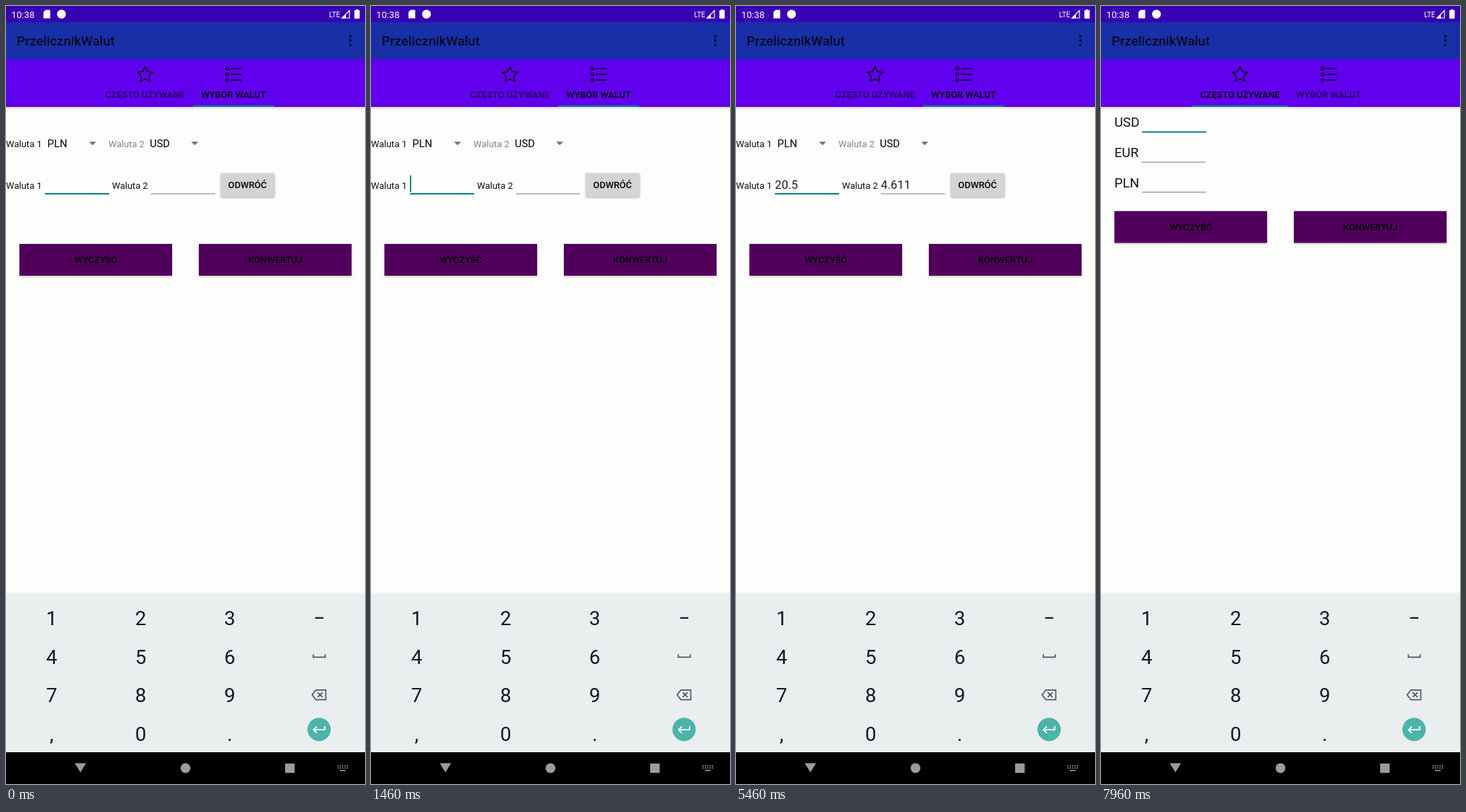
Animation of 508 by 1102 pixels, one loop 8000 ms. Source, as an HTML page with a canvas:

```html
<!DOCTYPE html>
<html lang="pl">
<head>
<meta charset="utf-8">
<title>PrzelicznikWalut</title>
<style>
html, body { margin: 0; width: 100%; height: 100%; overflow: hidden; background: #fdfdfd; }
canvas { display: block; width: 508px; height: 1102px; }
</style>
</head>
<body>
<canvas id="stage"></canvas>
<script>
const W = 508, H = 1102, LOOP = 8000;
const TEAL = '#00857b', INK = '#0c1a24', ICON = '#4b5b64';
const canvas = document.getElementById('stage');
const c = canvas.getContext('2d');
const dpr = window.devicePixelRatio || 1;
canvas.width = W * dpr;
canvas.height = H * dpr;

// Input events: [time, first field text]
const TYPING = [[1750, '2'], [1950, '20'], [2350, '20.'], [2750, '20.5']];
const CONVERT = 3900, SWITCH = 7100;

const clamp = v => Math.max(0, Math.min(1, v));
const mix = (a, b, p) => a + (b - a) * p;
const quintOut = p => 1 - Math.pow(1 - p, 5);
const smooth = p => p * p * (3 - 2 * p);

function rect(x, y, w, h, color) {
  c.fillStyle = color;
  c.fillRect(x, y, w, h);
}

function disc(x, y, r, color) {
  c.fillStyle = color;
  c.beginPath();
  c.arc(x, y, r, 0, Math.PI * 2);
  c.fill();
}

function trace(points, closed) {
  c.beginPath();
  points.forEach(([x, y]) => c.lineTo(x, y));
  if (closed) c.closePath();
}

function fillPoly(points, color) {
  trace(points, true);
  c.fillStyle = color;
  c.fill();
}

function line(points, color, width, closed) {
  trace(points, closed);
  c.strokeStyle = color;
  c.lineWidth = width;
  c.stroke();
}

function text(str, x, y, size, color = '#000', align = 'left', weight = 400) {
  c.font = `${weight} ${size}px Roboto, "Noto Sans", sans-serif`;
  c.textAlign = align;
  c.fillStyle = color;
  c.fillText(str, x, y);
}

function fade(y, h, from, to) {
  const g = c.createLinearGradient(0, y, 0, y + h);
  g.addColorStop(0, from);
  g.addColorStop(1, to);
  rect(0, y, W, h, g);
}

function button(label, x, y, w, h, color) {
  c.save();
  c.shadowColor = 'rgba(0,0,0,.3)';
  c.shadowBlur = 3 * dpr;
  c.shadowOffsetY = dpr;
  rect(x, y, w, h, color);
  c.restore();
  text(label, x + w / 2, y + h / 2 + 4.8, 13.07, '#000', 'center', 500);
}

function actions(y) {
  button('WYCZYŚĆ', 19, y, 216, 45, '#50005b');
  button('KONWERTUJ', 273, y, 216, 45, '#50005b');
}

function field(x, y, value, focused, cursor) {
  if (focused) rect(x, y - 1, 91, 2, TEAL);
  else rect(x, y - .5, 91, 1, '#7c7c7c');
  text(value, x, y - 7, 16.8, '#1c1c1c');
  if (cursor) rect(x + c.measureText(value).width, y - 26, 2, 23.5, TEAL);
}

function spinner(label, x, arrowX) {
  text(label, x, 200, 14.93);
  fillPoly([[arrowX - 5, 192.3], [arrowX + 5, 192.3], [arrowX, 197.3]], '#737373');
}

function blink(t, start) {
  return t >= start && (t - start) % 1000 < 500;
}

function choicePage(t) {
  let value = '', start = -600;
  for (const [at, str] of TYPING) if (t >= at) { value = str; start = at; }
  text('Waluta 1', 0, 199.5, 13.07, '#111');
  spinner('PLN', 58.5, 122.5);
  text('Waluta 2', 145, 199.5, 13.07, '#858585');
  spinner('USD', 203.5, 267);
  text('Waluta 1', 0, 258.5, 13.07, '#111');
  field(55, 266, value, true, blink(t, start));
  text('Waluta 2', 150, 258.5, 13.07, '#111');
  field(205, 266, t >= CONVERT ? '4.611' : '', false, false);
  button('ODWRÓĆ', 304, 236.5, 75.5, 34, '#d4d4d4');
  actions(337);
}

function frequentPage(t) {
  ['USD', 'EUR', 'PLN'].forEach((code, i) => {
    text(code, 19, 171.3 + i * 43, 18.67, '#111');
    field(i === 1 ? 57 : 58, 178.5 + i * 42.6, '', i === 0, i === 0 && blink(t, SWITCH));
  });
  actions(290.5);
}

function pages(t) {
  const shift = W * quintOut(clamp((t - SWITCH) / 250));
  c.save();
  c.beginPath();
  c.rect(0, 143, W, 690);
  c.clip();
  if (shift < W) {
    c.save();
    c.translate(shift, 0);
    choicePage(t);
    c.restore();
  }
  if (shift > 0) {
    c.translate(shift - W, 0);
    frequentPage(t);
  }
  c.restore();
}

function statusBar() {
  rect(0, 0, W, 23, '#3700b3');
  text('10:38', 7.5, 16.5, 13.2, '#fff');
  fillPoly([[56, 5.5], [62.5, 5.5], [62.5, 17.5], [53, 17.5], [53, 8.5]], '#fff');
  disc(78.5, 11.5, 6.3, '#fff');
  text('LTE', 473, 15.5, 10, '#fff', 'right');
  line([[475.5, 17], [486, 17], [486, 6.5]], '#fff', 1.2, true);
  fillPoly([[475, 17.5], [481, 17.5], [481, 11.5]], '#fff');
  rect(495, 4.8, 3.5, 2, '#fff');
  rect(493, 6, 7.5, 11.8, '#fff');
}

function toolbar() {
  rect(0, 23, W, 53, '#182fa8');
  text('PrzelicznikWalut', 15, 56.3, 18.67, '#0a0d20', 'left', 500);
  for (const y of [43, 49, 55]) disc(487.3, y, 1.9, '#0b123b');
}

function tabs(t) {
  const p = smooth(clamp((t - SWITCH) / 300));
  rect(0, 75.5, W, 67.5, '#6000ec');
  const star = [];
  for (let i = 0; i < 10; i++) {
    const a = -Math.PI / 2 + i * Math.PI / 5, r = i % 2 ? 5.6 : 11.6;
    star.push([196.7 + r * Math.cos(a), 97.5 + r * Math.sin(a)]);
  }
  c.lineJoin = 'round';
  line(star, '#08001c', 1.5, true);
  c.lineJoin = 'miter';
  for (const y of [88.5, 96.7, 105]) {
    c.beginPath();
    c.arc(313.2, y, 2.1, 0, Math.PI * 2);
    c.strokeStyle = '#08001c';
    c.lineWidth = 1.3;
    c.stroke();
    line([[318, y], [333.5, y]], '#08001c', 1.6);
  }
  const shade = a => `rgba(0,0,0,${a})`;
  text('CZĘSTO UŻYWANE', 196.7, 129.5, 13.07, shade(mix(.6, .95, p)), 'center', 500);
  text('WYBÓR WALUT', 322, 129.5, 13.07, shade(mix(.95, .6, p)), 'center', 500);
  const left = mix(265, 128.5, p), right = mix(379.5, 265, p);
  rect(left, 141, right - left, 2, '#048291');
  fade(143, 4, 'rgba(0,0,0,.13)', 'rgba(0,0,0,0)');
}

function keyboard() {
  fade(829, 4, 'rgba(0,0,0,0)', 'rgba(0,0,0,.05)');
  rect(0, 832.5, W, 224.5, '#ebeeef');
  ['123', '456', '789', ',0.'].forEach((row, r) => {
    [...row].forEach((key, i) => text(key, 64.5 + i * 126.1, 877 + r * 54.6, 28, INK, 'center'));
  });
  rect(437.5, 865.7, 11.5, 2.2, INK);
  line([[434.8, 918.3], [434.8, 922.3], [451.7, 922.3], [451.7, 918.3]], ICON, 1.7);
  line([[438.5, 968.8], [452.5, 968.8], [452.5, 982.6], [438.5, 982.6], [433.2, 975.7]], ICON, 1.7, true);
  line([[441, 972.2], [448, 979.2]], ICON, 1.7);
  line([[448, 972.2], [441, 979.2]], ICON, 1.7);
  disc(443, 1024.7, 16.5, '#4bb5a9');
  line([[451, 1020], [451, 1025.2], [435.5, 1025.2]], '#fff', 1.8);
  line([[439.8, 1020.6], [435.2, 1025.2], [439.8, 1029.8]], '#fff', 1.8);
}

function navBar() {
  const gray = '#9b9b98';
  rect(0, 1057, W, 45, '#000');
  fillPoly([[97.3, 1072.5], [113.3, 1072.5], [105.3, 1085.5]], gray);
  disc(254, 1079.5, 6.9, gray);
  rect(395, 1073, 13.5, 13.3, gray);
  for (let r = 0; r < 2; r++) {
    for (let i = 0; i < 5; i++) rect(469 + i * 3.3, 1075.5 + r * 3, 1.7, 1.7, gray);
  }
  rect(472.5, 1082, 8, 1.6, gray);
}

function draw(now) {
  const t = now % LOOP;
  c.setTransform(dpr, 0, 0, dpr, 0, 0);
  rect(0, 0, W, H, '#fdfdfc');
  pages(t);
  statusBar();
  toolbar();
  tabs(t);
  keyboard();
  navBar();
}

let origin;
function tick(now) {
  if (origin === undefined) origin = now;
  draw(now - origin);
  requestAnimationFrame(tick);
}
draw(0);
requestAnimationFrame(tick);
</script>
</body>
</html>
```
